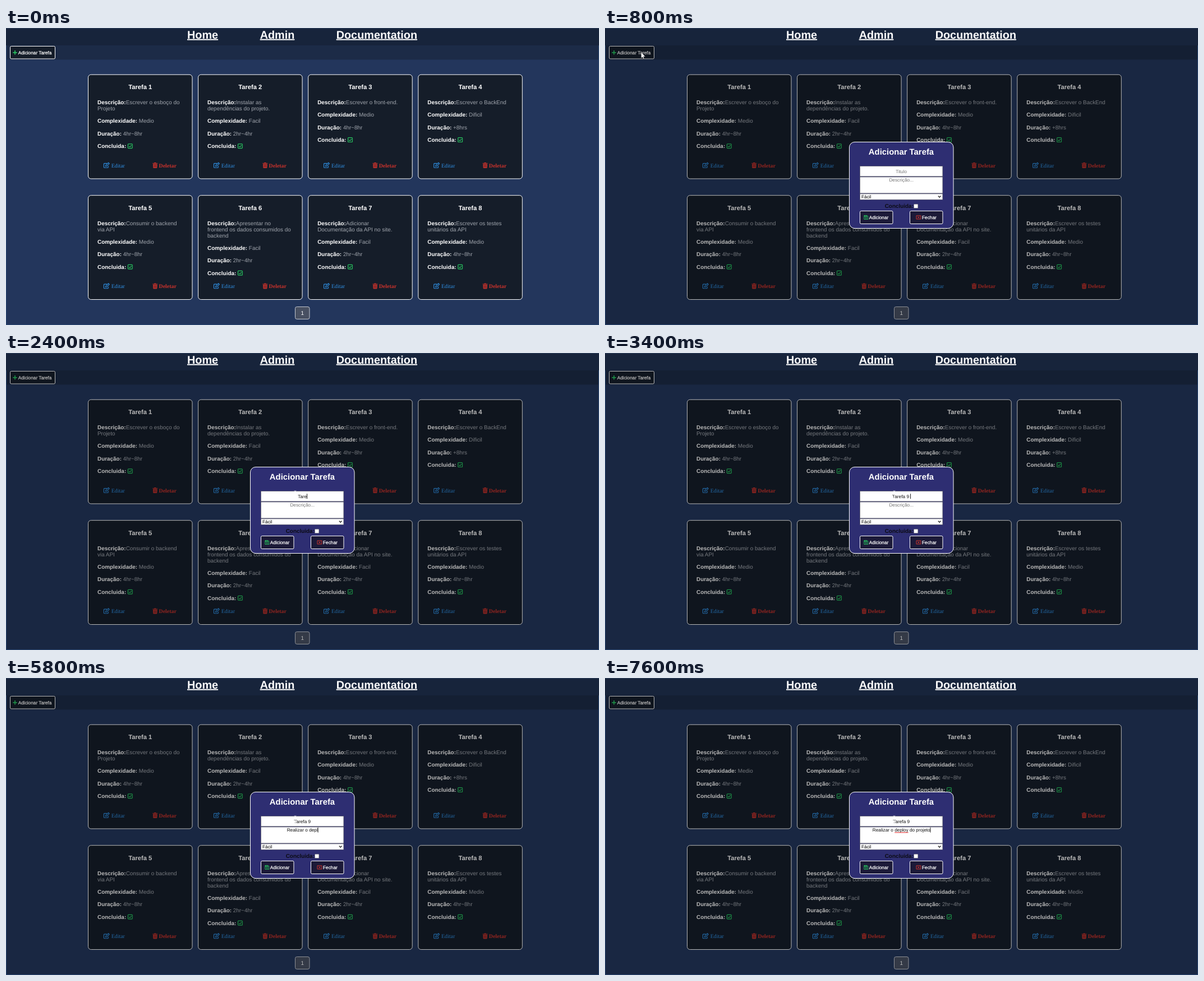
These frames come from a looping animation (1057x530 px, 8000 ms). An HTML page:

```html
<!DOCTYPE html>
<html lang="pt">
<head>
<meta charset="utf-8">
<title>Tarefas</title>
<style>
  html, body { margin: 0; width: 100%; height: 100%; overflow: hidden; background: #23365c; }
  svg { display: block; }
  text { font: 9.92px "Liberation Sans", Arial, sans-serif; white-space: pre; text-rendering: geometricPrecision; }
  .b { font-weight: bold; }
  .mid { text-anchor: middle; }
  .serif { font-family: "Liberation Serif", "Times New Roman", serif; }
  .nav { font-size: 19.84px; font-weight: bold; text-decoration: underline; }
  .title { font-size: 11.2px; }
  .small { font-size: 8.27px; }
  .label { stroke: #fff; stroke-width: .25; }
</style>
</head>
<body>
<svg id="stage" width="1057" height="530" viewBox="0 0 1057 530">
  <defs>
    <g id="check" fill="none" stroke="#27c05f" stroke-width="1.2">
      <rect x=".6" y=".6" width="7.8" height="7.8" rx="1"/>
      <path d="M2.3 4.6 4 6.2 7 3"/>
    </g>
    <g id="pen" fill="none" stroke="#2f8fe3" stroke-width="1.1">
      <path d="M6.2 1.9H1.6Q.6 1.9 .6 2.9V8.6Q.6 9.6 1.6 9.6H7.4Q8.4 9.6 8.4 8.6V6.3"/>
      <path d="M3.7 7.2 4 5.2 8.7.6 10.4 2.3 5.7 6.9Z"/>
    </g>
    <g id="trash">
      <path d="M0 .9H2.6L3.2 0H5.7L6.3.9H8.9V2.1H0ZM.6 2.7H8.3L7.9 9.2Q7.8 10 7 10H1.9Q1.1 10 1 9.2Z" fill="#c8322c"/>
      <path d="M2.7 4V8.7M4.45 4V8.7M6.2 4V8.7" stroke="#151d29" stroke-width=".6"/>
    </g>
  </defs>

  <rect width="1057" height="530" fill="#23365c"/>
  <rect y="31" width="1057" height="25.500" fill="#1c2b47"/>

  <rect id="addButton" x="7.500" y="32.500" width="80" height="22.500" rx="2" stroke="#fff"/>
  <path d="M12.300 43.800h7.400M16 40.100v7.400" stroke="#27c05f" stroke-width="1.700"/>
  <text x="21.700" y="46.800" class="small label" fill="#fff">Adicionar Tarefa</text>
  <g id="cards"></g>
  <rect x="515.500" y="497.500" width="25.500" height="22" rx="3" fill="#485062" stroke="#c4c8d0"/>
  <text x="528.200" y="512" class="mid" fill="#fff">1</text>

  <rect id="shade" x="1" y="31" width="1055" height="498" fill="#000" opacity=".28"/>
  <rect width="1057" height="31" fill="#17243b"/>
  <path d="M0 .5H1057" stroke="#2b3d5b"/>
  <path d="M.5 31V529.500H1056.500V31" fill="none" stroke="#274570"/>
  <g fill="#fff">
    <text x="323" y="18.700" class="nav">Home</text>
    <text x="452.700" y="18.700" class="nav">Admin</text>
    <text x="588.700" y="18.700" class="nav">Documentation</text>
  </g>

  <g id="modal">
    <rect x="435.500" y="203.500" width="185.500" height="154" rx="9.500" fill="#2e2e72" stroke="#fff"/>
    <text x="528" y="226.200" class="mid b" style="font-size:14.88px" fill="#fff">Adicionar Tarefa</text>
    <g fill="#fff" stroke="#5a5a66" stroke-width=".7">
      <rect x="454.400" y="246.600" width="147.500" height="18.200"/>
      <rect x="454.400" y="265.900" width="147.500" height="29"/>
      <rect x="454.400" y="295.900" width="147.500" height="10.400"/>
      <rect x="550.500" y="314.200" width="7.400" height="7.400" rx="1"/>
    </g>
    <text x="457" y="304" class="small">Fácil</text>
    <path d="M593.800 299.700 596.200 302.200 598.600 299.700" fill="none" stroke="#000" stroke-width="1.200"/>
    <text x="498.700" y="320.800" class="b" fill="#0c0c14">Concluida:</text>
    <g fill="#1c1a38" stroke="#fff">
      <rect x="454.500" y="326.500" width="58.500" height="23" rx="2"/>
      <rect x="543.500" y="326.500" width="58.500" height="23" rx="2"/>
    </g>
    <g fill="none" stroke="#27c05f">
      <path d="M461.900 334.500H467L468.700 336.200V341.400H461.900Z"/>
      <path d="M463.300 334.700V336.900H466.600V334.700M464 339.300H466.600" stroke-width="1.200"/>
    </g>
    <path d="M555 334.800H562.800V341H555ZM557.300 336.300 560.500 339.500M560.500 336.300 557.300 339.500" fill="none" stroke="#c8322c"/>
    <g class="label" fill="#fff">
      <text x="470.800" y="340.800" class="small">Adicionar</text>
      <text x="565" y="340.800" class="small">Fechar</text>
    </g>
    <text id="name" x="528.200" y="258.600" class="mid small"></text>
    <text id="details" x="528.200" y="274.200" class="mid small"></text>
    <path id="spelling" stroke="#e02020" stroke-width="1"/>
    <path id="caret" stroke="#000" stroke-width=".9"/>
  </g>

  <path id="arrow" d="M0 0V10.300L2.400 8.200 3.900 11.500 5.400 10.800 4 7.600H7.200Z" fill="#fff" stroke="#222" stroke-width=".4"/>
  <path id="hand" d="M-.9.500Q0-.5.900.500V4.500L5 5.500Q6 6 5.900 7.500L5 11.500V13H-.5V11.500L-3.300 7.600Q-3.300 6.300-2.200 6.600L-.9 8Z" fill="#fff" stroke="#222" stroke-width=".5"/>
  <path id="beam" d="M-1.800-6H-.4L0-5.500.4-6H1.800M0-5.500V5.500M-1.800 6H-.4L0 5.500.4 6H1.800" fill="none" stroke="#fff" stroke-width=".8"/>
</svg>

<script>
const el = id => document.getElementById(id);

const tasks = [
  [["Escrever o esboço do", "Projeto"], "Medio", "4hr~8hr"],
  [["Instalar as", "dependências do projeto."], "Facil", "2hr~4hr"],
  [["Escrever o front-end."], "Medio", "4hr~8hr"],
  [["Escrever o BackEnd"], "Dificil", "+8hrs"],
  [["Consumir o backend", "via API"], "Medio", "4hr~8hr"],
  [["Apresentar no", "frontend os dados consumidos do", "backend"], "Facil", "2hr~4hr"],
  [["Adicionar", "Documentação da API no site."], "Facil", "2hr~4hr"],
  [["Escrever os testes", "unitários da API"], "Medio", "4hr~8hr"]
];

const row = (y, label, value = "") =>
  `<text x="17" y="${y}" fill="#a0a5ad"><tspan class="b" fill="#fff">${label}:</tspan>${value}</text>`;

function card([lines, level, duration], i) {
  const y = 53 + (lines.length - 1) * 11.1;
  const more = lines.slice(1).map((line, n) =>
    `<text x="17" y="${64.2 + n * 11.1}" fill="#a0a5ad">${line}</text>`).join("");
  return `<g transform="translate(${146 + i % 4 * 196.1} ${83 + Math.floor(i / 4) * 215.5})">
    <rect x=".5" y=".2" width="185.500" height="185.800" rx="5" fill="#151d29" stroke="#fff"/>
    <text x="93.200" y="26.200" class="mid b title" fill="#fff">Tarefa ${i + 1}</text>
    ${row(53, "Descrição", lines[0])}${more}
    ${row(y + 22.3, "Complexidade", " " + level)}
    ${row(y + 44.6, "Duração", " " + duration)}
    ${row(y + 66.9, "Concluida", "")}
    <use href="#check" x="70.800" y="${y + 70.1 - 11}"/>
    <use href="#pen" x="27.800" y="156.700"/>
    <text x="41.700" y="165.600" class="serif" fill="#2f8fe3">Editar</text>
    <use href="#trash" x="115.300" y="157"/>
    <text x="126.500" y="165.600" class="serif b" fill="#c8322c">Deletar</text>
  </g>`;
}
el("cards").innerHTML = tasks.map(card).join("");

// Each entry: time in ms, number of characters typed so far
const nameKeys = [[2000, 1], [2200, 2], [2300, 3], [2400, 4], [2500, 5],
  [2700, 6], [3000, 7], [3200, 8], [3400, 9], [3700, 8]];
const detailKeys = [[4300, 1], [4500, 2], [4600, 3], [4900, 4], [5000, 5], [5100, 6],
  [5200, 8], [5300, 9], [5400, 10], [5500, 11], [5600, 13], [5700, 14], [5800, 15],
  [6100, 16], [6200, 17], [6400, 18], [6600, 19], [6700, 20], [6800, 21], [6900, 22],
  [7000, 23], [7200, 24], [7300, 25], [7500, 27], [7600, 28]];

// Each entry: time in ms, x, y
const pointer = [[0, 13, -13], [100, 14, -4], [400, 40, 22], [600, 65, 44], [800, 64.5, 43.5],
  [900, 197, 107], [1000, 340, 168], [1100, 454, 210], [1200, 454, 210], [1500, 515.5, 252]];

const show = (id, visible) => el(id).style.display = visible ? "" : "none";

function pointerAt(t) {
  const next = pointer.findIndex(p => p[0] > t);
  if (next < 0) return pointer[pointer.length - 1].slice(1);
  const [t0, x0, y0] = pointer[next - 1], [t1, x1, y1] = pointer[next];
  const k = (t - t0) / (t1 - t0);
  return [x0 + (x1 - x0) * k, y0 + (y1 - y0) * k];
}

function typeInto(id, text, keys, placeholder, t) {
  const count = keys.reduce((n, [at, length]) => t >= at ? length : n, 0);
  const field = el(id);
  field.textContent = count ? text.slice(0, count) : placeholder;
  field.setAttribute("fill", count ? "#111" : "#757575");
  return 528.2 + (count ? field.getComputedTextLength() / 2 : 0);
}

function draw(t) {
  const open = t >= 800;
  show("shade", open);
  show("modal", open);

  const nameEnd = typeInto("name", "Tarefa 9 ", nameKeys, "Titulo", t);
  const detailsEnd = typeInto("details", "Realizar o deploy do projeto", detailKeys, "Descrição...", t);
  const inDetails = t >= 4000;
  show("caret", t >= 1600 && !(t >= 3900 && t < 4000));
  el("caret").setAttribute("d", inDetails ? `M${detailsEnd + .3} 266.700v9` : `M${nameEnd + .3} 251.200v9`);

  const misspelt = t >= 6400;
  show("spelling", misspelt);
  if (misspelt) {
    const from = el("details").getStartPositionOfChar(11).x;
    const to = el("details").getEndPositionOfChar(16).x;
    el("spelling").setAttribute("d", `M${from} 275.800H${to}`);
  }

  const [x, y] = pointerAt(t);
  const hover = !open && x > 7 && x < 88 && y > 32 && y < 55;
  const shape = hover ? "hand" : t >= 1500 ? "beam" : "arrow";
  for (const id of ["arrow", "hand", "beam"]) show(id, id === shape);
  el(shape).setAttribute("transform", `translate(${x} ${y})`);
  el("addButton").setAttribute("fill", hover ? "#3d4350" : "#151d29");
}

function tick() {
  draw(Math.floor(performance.now() % 8000 / 100) * 100);
  requestAnimationFrame(tick);
}
tick();
</script>
</body>
</html>
```
